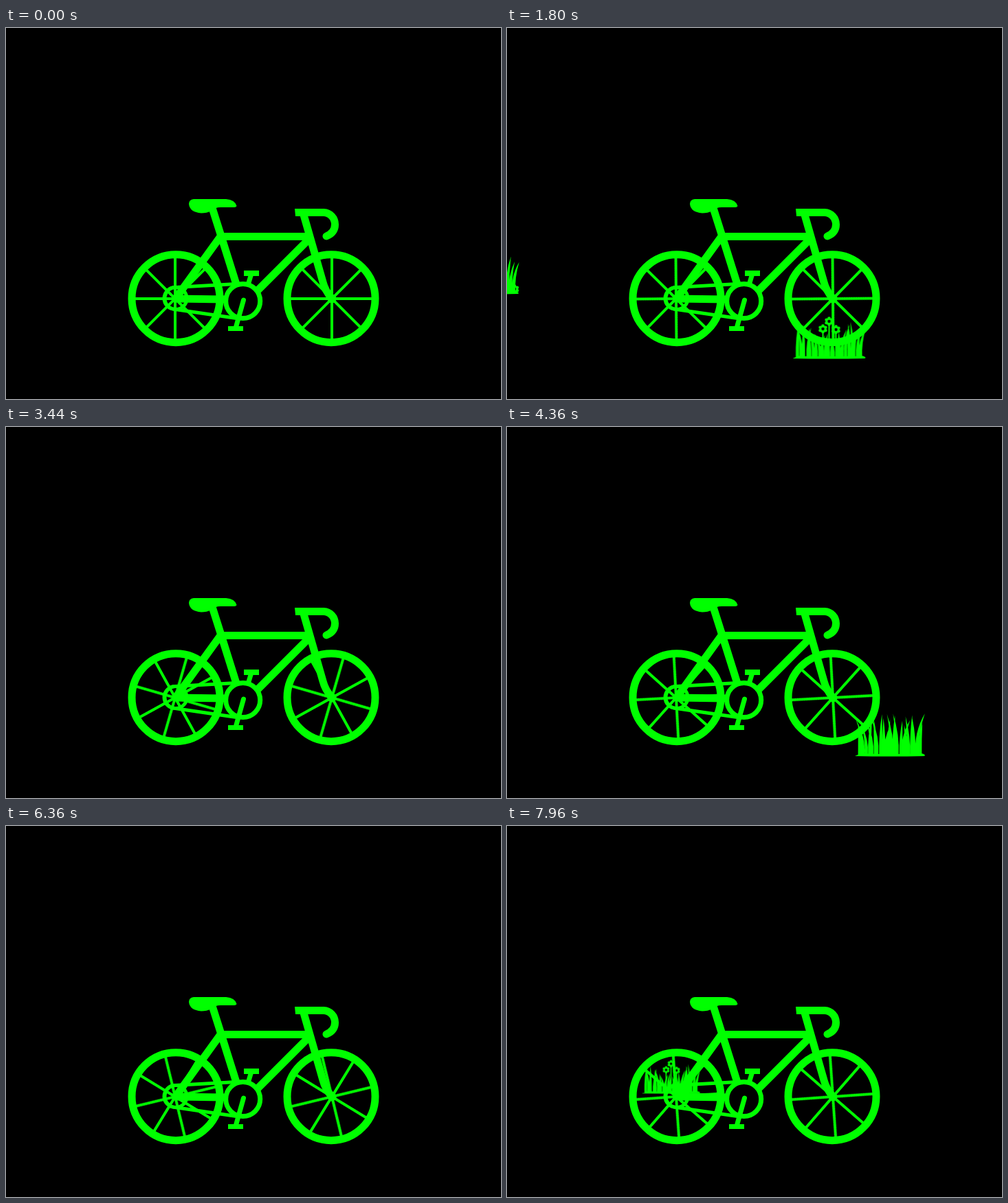
Write an HTML page that moves like this. It is 720 by 540 pixels and loops after 8000 ms.

```html
<!DOCTYPE html>
<html lang="en">
<head>
<meta charset="utf-8">
<title>Bicycle ride</title>
<style>
  html, body { margin: 0; width: 100%; height: 100%; overflow: hidden; background: #000; }
  svg { display: block; width: 720px; height: 540px; }
  .line { fill: none; stroke: #0f0; }
  .solid { fill: #0f0; }
</style>
</head>
<body>
<svg viewBox="0 0 720 540">
  <g id="meadow"></g>
  <g id="wheels"></g>
  <g class="line" stroke-width="5">
    <path d="M335 372.5 L246 377.5 A16 16 0 0 0 246 409.5 L335 422.5"/>
    <circle cx="247" cy="393.5" r="16"/>
  </g>
  <g class="line" stroke-width="11">
    <path d="M300 262 L313 303 L335 373 M313 303.5 H441"/>
    <path d="M313 302 L248 392"/>
    <path d="M247 394 L318 395"/>
    <path d="M442 306 L366 382"/>
    <path d="M433 272 L443 307 L461 370 Q464 382 474 394"/>
    <path d="M460 268.5 H462 A17 17.5 0 0 1 478.5 286 Q478.5 298 466 303" stroke-linecap="round"/>
  </g>
  <g class="line" stroke-width="7">
    <circle cx="344.7" cy="397.5" r="25"/>
    <path d="M345.5 396 L334 437" stroke-linecap="round"/>
    <path d="M356.5 359 L352 374"/>
  </g>
  <g class="solid">
    <path d="M273 249 H320 Q333 250 335.5 259 Q335 261 332 261 H312 Q304 261 299 266 Q292 269.5 284 269.5 Q267 268 266 256 Q266 250 273 249Z"/>
    <path d="M420 263 H462 V274 H421Z"/>
    <rect x="346" y="353" width="22" height="8"/>
    <rect x="323" y="434" width="22" height="7"/>
    <circle cx="474" cy="394" r="6.5"/>
    <circle cx="248" cy="394" r="5"/>
  </g>
</svg>
<script>
const FRAMES = 200, DURATION = 8000, SPIN = 6.99;

const add = (parent, tag, attrs = {}) => {
  const el = document.createElementNS('http://www.w3.org/2000/svg', tag);
  for (const key in attrs) el.setAttribute(key, attrs[key]);
  return parent.appendChild(el);
};

const play = (el, from, to) => el.animate(
  [{ transform: from }, { transform: to }],
  { duration: DURATION, iterations: Infinity, easing: `steps(${FRAMES}, end)` }
);

const seeded = seed => () => (seed = (seed * 16807) % 2147483647) / 2147483647;

// A tapered blade that starts upright and bends over towards its tip.
const blade = (x, lean, h) =>
  `M${x - 2.4} 0Q${x - 2.6 - lean * .2} ${-h * .55} ${x + lean} ${-h}` +
  `Q${x + 2.8 - lean * .2} ${-h * .5} ${x + 2.4} 0Z`;

function drawBloom(parent, x, y) {
  add(parent, 'path', { d: `M${x} ${4 - y}V0`, class: 'line', 'stroke-width': 2 });
  for (let a = Math.PI / 6; a < 2 * Math.PI; a += Math.PI / 3) {
    add(parent, 'circle', {
      cx: x + 4.3 * Math.cos(a), cy: 4.3 * Math.sin(a) - y, r: 2.4, class: 'solid'
    });
  }
}

// dip lowers the blades in the middle to leave room for blooms.
function drawTuft(parent, { seed, width, height, dip, blooms }) {
  const random = seeded(seed), count = 22;
  let d = `M-1 1L8 -3Q${width / 2} -1 ${width - 5} -3Q${width + 2} -1 ${width - 1} 1Q${width / 2} 2 -1 1Z`;
  for (let i = 0; i < count; i++) {
    const u = (i + .5 + (random() - .5) * .6) / count;
    const lean = (u - .5) * 8 + (random() - .5) * 16;
    const h = height * (.7 + .3 * random()) * (1 - dip * Math.sin(Math.PI * u) ** 4);
    d += blade(5 + u * (width - 10), lean, h);
  }
  add(parent, 'path', { d, class: 'solid' });
  for (const [x, y] of blooms) drawBloom(parent, x, y);
}

const flowers = { seed: 4211, width: 105, height: 58, dip: .35, blooms: [[52, 53], [43, 42], [62, 41]] };
const grass = { seed: 9173, width: 101, height: 62, dip: 0, blooms: [] };
const daisies = { seed: 6007, width: 102, height: 57, dip: .2, blooms: [[43, 43], [58, 43], [96, 6]] };

// x is the left edge at the given step; speed is pixels per step.
const passes = [
  { plant: daisies, x: 185, y: 386, step: 30, speed: 18 },
  { plant: flowers, x: 68, y: 480, step: 62, speed: 20.5 },
  { plant: grass, x: 507, y: 478, step: 109, speed: 17.65 },
  { plant: flowers, x: 197, y: 388.5, step: 199, speed: 18, scale: .8 }
];

const meadow = document.getElementById('meadow');
for (const { plant, x, y, step, speed, scale = 1 } of passes) {
  const tuft = add(meadow, 'g');
  drawTuft(tuft, plant);
  const at = n => `translate(${x - speed * (n - step)}px, ${y}px) scale(${scale})`;
  play(tuft, at(0), at(FRAMES));
}

const wheels = document.getElementById('wheels');
for (const [rimX, hubX] of [[247, 246], [473, 474]]) {
  add(wheels, 'circle', { cx: rimX, cy: 393.7, r: 64, class: 'line', 'stroke-width': 11 });
  const hub = add(wheels, 'g', { transform: `translate(${hubX} 394)` });
  const spokes = add(hub, 'g', { class: 'line', 'stroke-width': 4 });
  for (let a = 0; a < 180; a += 45) {
    add(spokes, 'path', { d: 'M-61 0H61', transform: `rotate(${a})` });
  }
  play(spokes, 'rotate(0deg)', `rotate(${SPIN * FRAMES}deg)`);
}
</script>
</body>
</html>
```
